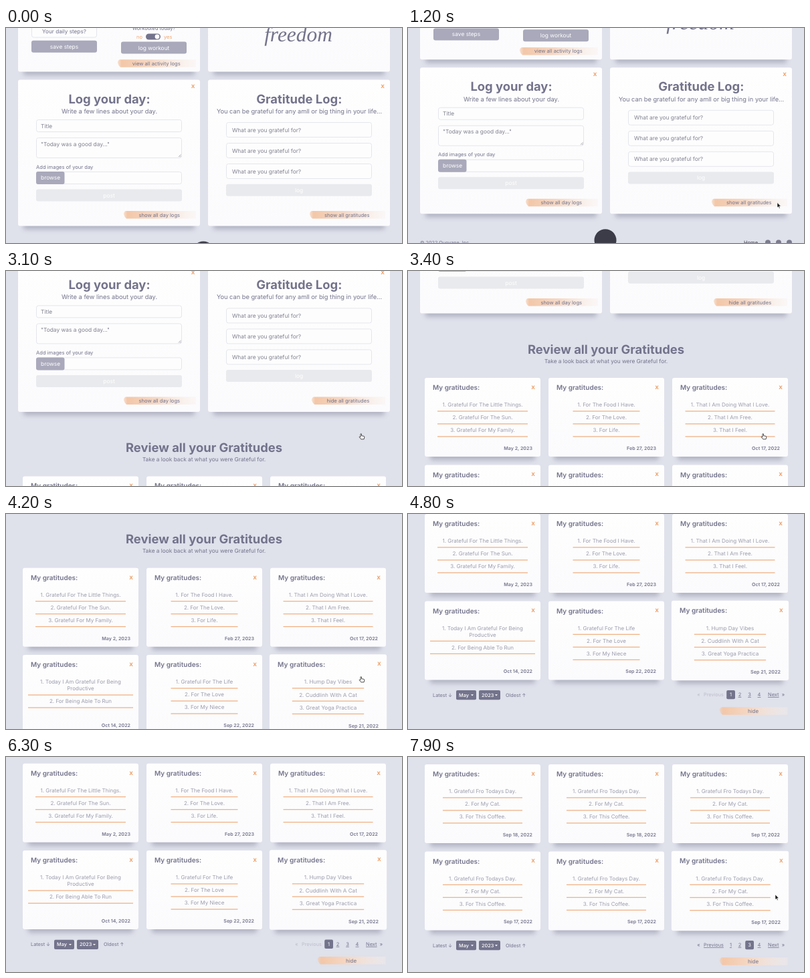
An HTML page that plays this animation: 592 px wide and 322 px high, repeating every 8 s.

```html
<!DOCTYPE html>
<html lang="en">
<head>
<meta charset="utf-8">
<title>Gratitude journal</title>
<style>
  html, body { margin: 0; width: 100%; height: 100%; overflow: hidden; background: #dfe1eb; }
  svg { display: block; width: 592px; height: 322px; font-family: Inter, "Open Sans", sans-serif; text-rendering: geometricPrecision; }
</style>
</head>
<body>
<svg id="stage" viewBox="0 0 592 322"></svg>
<script>
const LOOP = 8000, STEP = 100;
const INK = '#73738c', ORANGE = '#efa673', MUTED = '#9c9cad', HINT = '#80808f', BUTTON = '#a9a9bb';
const SECTION_TOP = 233;

// Text centred vertically on y.
function text(x, y, str, size, o = {}) {
  const { fill = INK, weight = 400, anchor = 'start', extra = '' } = o;
  return `<text x="${x}" y="${y + size * 0.36}" font-size="${size}" fill="${fill}" font-weight="${weight}" text-anchor="${anchor}" ${extra}>${str}</text>`;
}
const middle = (x, y, str, size, o = {}) => text(x, y, str, size, { ...o, anchor: 'middle' });

const rect = (x, y, w, h, fill, rx = 3, extra = '') =>
  `<rect x="${x}" y="${y}" width="${w}" height="${h}" rx="${rx}" fill="${fill}" ${extra}/>`;

const circle = (x, y, r, fill) => `<circle cx="${x}" cy="${y}" r="${r}" fill="${fill}"/>`;

const panel = (x, y, w, h) =>
  rect(x + 8, y + 12, w - 16, h - 7, '#6c6e86', 3, 'opacity=".4" filter="url(#soft)"') +
  rect(x, y, w, h, 'url(#paper)');

const field = (x, y, w, h, label = '', pad = 7) =>
  rect(x + .5, y + .5, w - 1, h - 1, '#fdfdfe', 3, 'stroke="#e5e6eb"') +
  text(x + pad, y + Math.min(h / 2, 9.5 + (h < 24 ? 2 : 0)), label, 8.4, { fill: HINT });

const button = (x, y, w, h, label, fill) =>
  rect(x, y, w, h, fill) + middle(x + w / 2, y + h / 2, label, 8.4, { fill: '#fff' });

const close = (x, y) => middle(x, y - .6, 'x', 9.8, { fill: ORANGE, weight: 700 });

// Brush-like label button with a rounded left end, fading out to the right.
const brush = (left, right, y, label, size = 7.6) =>
  `<path d="M${left + 3} ${y}H${right}V${y + 11.5}H${left + 4}Q${left + 1} ${y + 9} ${left} ${y + 5}Q${left} ${y + 1} ${left + 3} ${y}Z" fill="url(#brush)"/>` +
  middle((left + right) / 2 - .7, y + 5.8, label, size);

const defs = `<defs>
  <filter id="soft" x="-20%" y="-20%" width="140%" height="150%"><feGaussianBlur stdDeviation="3.6"/></filter>
  <linearGradient id="paper" x2="0" y2="1"><stop stop-color="#fefefe"/><stop offset="1" stop-color="#fbfbfd"/></linearGradient>
  <linearGradient id="brush">
    <stop stop-color="#f3c7a8" stop-opacity=".5"/><stop offset=".05" stop-color="#f3c7a8"/>
    <stop offset=".45" stop-color="#f5d8c5"/><stop offset="1" stop-color="#f9efe9" stop-opacity=".35"/>
  </linearGradient>
</defs>`;

function activityRow() {
  return panel(18, -150, 272, 215.5) + panel(302, -150, 272, 215.5) +
    field(38, -5, 98, 19.5) + middle(87, 5, 'Your daily steps?', 8.2) +
    button(38, 18.7, 98, 18, 'save steps', BUTTON) +
    middle(221, .6, 'Workouted today?', 7.5) +
    text(195, 13, 'no', 7.5, { fill: ORANGE }) + text(236, 13, 'yes', 7.5, { fill: ORANGE }) +
    rect(209, 8.5, 22, 9, INK, 4.5) + circle(226, 13, 3.4, '#fff') +
    button(172, 20.5, 98, 18, 'log workout', BUTTON) +
    brush(167, 284, 47.2, 'view all activity logs') +
    `<text x="437" y="19.8" font-family="'Liberation Serif', serif" font-style="italic" font-size="31.4" fill="${INK}" text-anchor="middle">freedom</text>`;
}

function dayForm() {
  return panel(18, 77.5, 272, 219) + close(279.5, 87.5) +
    middle(154.5, 106, 'Log your day:', 18.4, { weight: 700 }) +
    middle(154.5, 124.5, 'Write a few lines about your day.', 9.3) +
    field(45, 137, 218, 19, 'Title') +
    field(45, 164, 218, 31, '"Today was a good day..."') +
    `<path d="M258 193l3.5-3.5M260 193.3l1.7-1.7" stroke="#85858f" stroke-width=".7"/>` +
    text(45, 207.8, 'Add images of your day', 7.6) +
    field(45, 215, 218, 19) + rect(45, 215, 42.5, 19, BUTTON) +
    text(52, 224.3, 'browse', 8.4, { fill: '#fff' }) +
    button(45, 241.5, 218, 18, 'post', '#e9eaed') +
    brush(176, 284, 274, 'show all day logs');
}

function gratitudeForm() {
  return panel(302, 77.5, 272, 219) + close(563, 87.5) +
    middle(438.3, 106, 'Gratitude Log:', 18.4, { weight: 700 }) +
    middle(438.5, 124.5, 'You can be grateful for any amll or big thing in your life...', 9.25) +
    [141, 172, 203].map(y => field(329, y, 218, 23, 'What are you grateful for?', 9)).join('') +
    button(329, 233.7, 218, 18, 'log', '#e9eaed') +
    `<g id="show">${brush(454, 567, 274, 'show all gratitudes')}</g>` +
    `<g id="hide">${brush(457, 567, 274, 'hide all gratitudes')}</g>`;
}

function footer() {
  return text(18, 339.5, '© 2022 Quovane, Inc', 7.2) +
    circle(295, 336, 16.5, '#3c3c48') +
    text(502, 339.2, 'Home', 7.5, { fill: '#3c3c48' }) +
    [538, 554, 570].map(x => circle(x, 339.5, 4, '#7b7b8e')).join('');
}

// Each item is one line or an array of wrapped lines; half is half the rule width.
const card = (half, date, ...items) => ({ half, date, items });
const daily = date => card(59.5, date, 'Grateful Fro Todays Day.', 'For My Cat.', 'For This Coffee.');
const pages = [
  [
    card(67.5, 'May 2, 2023', 'Grateful For The Little Things.', 'Grateful For The Sun.', 'Grateful For My Family.'),
    card(50, 'Feb 27, 2023', 'For The Food I Have.', 'For The Love.', 'For Life.'),
    card(67, 'Oct 17, 2022', 'That I Am Doing What I Love.', 'That I Am Free.', 'That I Feel.'),
    card(78.5, 'Oct 14, 2022', ['Today I Am Grateful For Being', 'Productive'], 'For Being Able To Run'),
    card(50, 'Sep 22, 2022', 'Grateful For The Life', 'For The Love', 'For My Niece'),
    card(53, 'Sep 21, 2022', 'Hump Day Vibes', 'Cuddlinh With A Cat', 'Great Yoga Practica')
  ],
  [
    card(78.5, 'Sep 20, 2022', ['Today I Am Grateful For The', 'Morning Walk'], 'For My Friends'),
    ...['Sep 20', 'Sep 19', 'Sep 19', 'Sep 19', 'Sep 18'].map(d => daily(d + ', 2022'))
  ],
  [18, 18, 17, 17, 17, 17].map(d => daily(`Sep ${d}, 2022`))
];

function gratitudeCard({ half, date, items }, i) {
  const x = 25 + (i % 3) * 185, y = 160 + Math.floor(i / 3) * 130.4, mid = x + 86.5;
  let cy = y + 40.5, body = '';
  items.forEach((item, n) => {
    [].concat(item).forEach((line, k) => {
      if (k) cy += 10;
      body += middle(mid, cy, (k ? '' : `${n + 1}. `) + line, 8, { fill: MUTED });
    });
    body += rect(mid - half, cy + 8.8, half * 2, 1.3, '#f1b287', 0);
    cy += 19;
  });
  return `<g class="${i === 5 ? 'hover' : ''}">` + panel(x, y, 173, 118) +
    text(x + 12, y + 14.5, 'My gratitudes:', 10, { weight: 600 }) + close(x + 162, y + 14) +
    body + text(x + 161, y + 105.5, date, 7.1, { weight: 600, anchor: 'end' }) + '</g>';
}

function pager(current) {
  const y = 430.5, under = 'text-decoration="underline"';
  const numbers = [482.5, 496, 510.5, 525].map((x, i) => i === current
    ? rect(x - 6.3, y - 6.6, 12.8, 13.4, INK, 2) + middle(x, y, i + 1, 7.5, { fill: '#fff' })
    : middle(x, y, i + 1, 7.5, { extra: under })).join('');
  const prev = current ? { extra: under } : { fill: '#bcbdca' };
  return middle(434.5, y, '«', 7.5, { fill: prev.fill }) + text(442, y, 'Previous', 7.3, prev) + numbers +
    text(538, y, 'Next', 7.5, { extra: under }) + middle(561, y, '»', 7.5);
}

function select(x, w, label) {
  const cx = x + w - 6;
  return rect(x, 424, w, 14.2, INK, 2) + text(x + 4, 431, label, 7.3, { fill: '#fff', weight: 500 }) +
    `<path d="M${cx - 2} 430.2h4l-2 2.2z" fill="#fff"/>`;
}

function review() {
  return middle(296, 117, 'Review all your Gratitudes', 18.4, { weight: 700 }) +
    middle(296, 134.8, 'Take a look back at what you were Grateful for.', 8.3) +
    pages.map((cards, i) => `<g class="page">${cards.map(gratitudeCard).join('')}${pager(i)}</g>`).join('') +
    text(37, 431, 'Latest ↓', 7.3) + select(72, 30, 'May') + select(106, 32, '2023') +
    text(146, 431, 'Oldest ↑', 7.3) + brush(466, 567.5, 449.2, 'hide', 7.9);
}

const arrow = `<path id="arrow" d="M0 0V7.6L1.8 6L3 8.7L4.2 8.2L3 5.6H5.4Z" fill="#111" stroke="#fff" stroke-width=".6"/>`;
const hand = `<path id="hand" d="M0 .6Q.8-.4 1.5.6V3.2L5 3.9Q6 4.2 5.8 5.4L5.1 8.4H.8L-1.8 5.2Q-1.6 4.2-.6 4.8L0 5.2Z" fill="#fff" stroke="#222" stroke-width=".8"/>`;

const stage = document.getElementById('stage');
stage.innerHTML = defs +
  `<g id="page">${activityRow()}${dayForm()}${gratitudeForm()}<g id="footer">${footer()}</g>` +
  `<g id="review" transform="translate(0 ${SECTION_TOP})">${review()}</g></g>` +
  `<g id="cursor">${arrow}${hand}</g>`;

const el = id => document.getElementById(id);
const toggle = (node, on) => node.setAttribute('display', on ? 'inline' : 'none');
const pageGroups = [...document.querySelectorAll('.page')];
const hoverCards = [...document.querySelectorAll('.hover')];

// Keys are [time, ...values]; values are interpolated linearly.
function track(keys, t) {
  const next = keys.findIndex(k => k[0] > t);
  if (next < 0) return keys[keys.length - 1].slice(1);
  if (next === 0) return keys[0].slice(1);
  const a = keys[next - 1], b = keys[next], p = (t - a[0]) / (b[0] - a[0]);
  return a.slice(1).map((v, i) => v + (b[i + 1] - v) * p);
}

const scrollKeys = [[900, 0], [1500, 36.5], [3000, 36.5], [3400, 233], [3600, 302], [3800, 302],
  [4200, 312.3], [4500, 393], [5200, 393], [5700, 383.3], [6600, 383.3], [6700, 382]];
const cursorKeys = [[0, 560, -12], [400, 577, 120], [900, 574, 272], [1500, 530, 251], [1800, 530, 251],
  [2200, 530, 243.5], [6300, 530, 243.5], [6600, 496, 280], [6800, 496, 280], [7000, 510, 280],
  [7400, 510, 280], [7800, 549, 206]];
const hoverKeys = [[3900, 0], [4100, 1], [6400, 1], [6600, 0], [7500, 0], [7700, 1]];

function render(t) {
  const [scroll] = track(scrollKeys, t), [x, y] = track(cursorKeys, t), [hover] = track(hoverKeys, t);
  const open = t >= 2500, current = t < 6700 ? 0 : t < 7400 ? 1 : 2;
  el('page').setAttribute('transform', `translate(0 ${-scroll})`);
  toggle(el('show'), !open);
  toggle(el('footer'), !open);
  toggle(el('hide'), open);
  toggle(el('review'), open);
  pageGroups.forEach((g, i) => toggle(g, i === current));
  const s = 1 + 0.013 * hover;
  hoverCards.forEach(g => g.setAttribute('transform', `translate(481.5 349.4) scale(${s}) translate(-481.5 -349.4)`));

  const pointing = (t >= 2000 && t < 4500) || (t >= 6400 && t < 7500);
  toggle(el('cursor'), t < 4500 || t >= 6400);
  toggle(el('hand'), pointing);
  toggle(el('arrow'), !pointing);
  el('cursor').setAttribute('transform', `translate(${x} ${y})`);
}

// The picture advances in steps of a tenth of a second.
const start = performance.now();
function frame() {
  const t = (performance.now() - start) % LOOP;
  render(Math.floor(t / STEP) * STEP);
  requestAnimationFrame(frame);
}
render(0);
requestAnimationFrame(frame);
</script>
</body>
</html>
```
